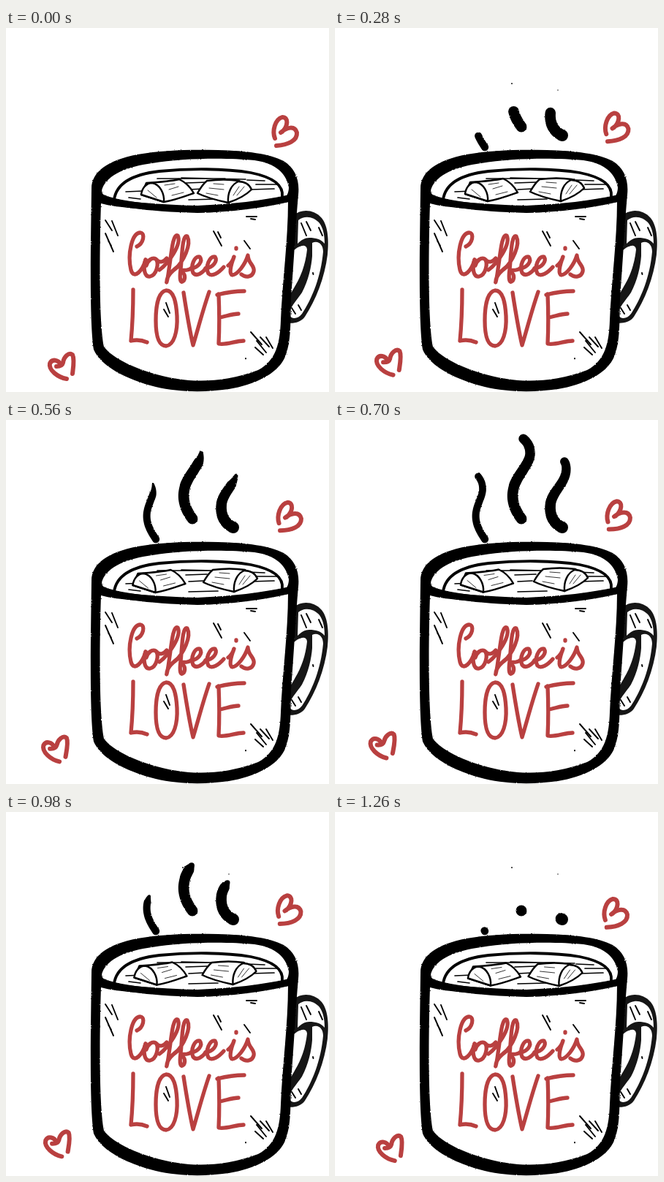
Animation, 442 px wide and 498 px high, one loop 1400 ms. Source, as an HTML page:

```html
<!DOCTYPE html>
<html lang="en">
<head>
<meta charset="utf-8">
<title>Coffee is love</title>
<style>
html, body { margin: 0; width: 100%; height: 100%; overflow: hidden; background: #fff; }
svg { display: block; width: 100vw; height: 100vh; }
.line { fill: none; stroke: #000; stroke-linecap: round; stroke-linejoin: round; }
.red { fill: none; stroke: #b94040; stroke-linecap: round; stroke-linejoin: round; }
.white { fill: #fff; }
</style>
</head>
<body>
<svg viewBox="0 0 442 498" role="img" aria-label="Coffee is LOVE">
  <defs>
    <filter id="rough" filterUnits="userSpaceOnUse" x="0" y="0" width="442" height="498" color-interpolation-filters="sRGB">
      <feTurbulence type="fractalNoise" baseFrequency=".5" numOctaves="2" seed="4"/>
      <feDisplacementMap in="SourceGraphic" scale="2.2" xChannelSelector="R" yChannelSelector="G"/>
    </filter>
  </defs>

  <!-- handle -->
  <g fill="#161616">
    <path d="M394 256C404 247 422 248 432 260C441 271 442 292 440 310C436 342 424 372 409 395C402 405 388 405 378 402L380 374C391 364 399 349 404 329C408 315 411 304 407 300C403 297 399 300 394 304Z"/>
    <path class="white" d="M400 263C409 256 421 258 429 267C434 274 436 283 436 295C431 289 424 287 415 287C409 287 404 290 399 295Z"/>
    <path class="white" d="M419 294C427 290 434 296 434 306C431 340 419 370 405 391C400 398 391 399 388 393C387 383 397 374 405 362C414 345 418 326 419 312Z"/>
    <path class="white" d="M396 304C402 297 411 295 412 303C410 323 403 343 392 358Z"/>
  </g>

  <!-- mug -->
  <g filter="url(#rough)">
    <path d="M117 220C117 196 140 181 180 173C215 167 250 166 290 167C330 168 360 172 380 182C396 192 402 208 400 228C397 260 394 320 390 370C389 400 391 430 381 452C370 474 340 488 305 494C270 499 235 498 205 491C165 481 130 463 120 440C114 400 116 300 117 220Z"/>
    <path class="white" d="M130 240C150 246 210 250 262 252C310 250 350 245 386 238C386 290 378 350 376 400C375 430 370 455 345 468C310 481 280 484 250 482C205 478 150 458 134 436C127 400 128 300 130 240Z"/>
    <path class="white" d="M132 219C140 200 165 190 200 185C240 178 300 177 340 181C370 185 384 200 387 218C387 224 385 228 384 229C350 236 310 241 262 243C210 242 160 237 140 233C134 230 129 225 132 219Z"/>
  </g>
  <path class="line" stroke-width="3.8" d="M148 235C151 211 175 200 210 196C250 192 300 192 335 198C365 204 380 215 378 231"/>

  <!-- drink -->
  <path class="line" stroke-width="1.7" d="M207 206L300 206M240 205L328 207M246 212L275 211M330 208L354 209M342 214L373 214M164 224L188 223M168 232L184 234M250 221L270 220M335 221L367 220M250 235L290 234"/>
  <g id="sweetL">
    <path class="line" style="fill:#fff" stroke-width="2.4" d="M192 212C208 211 224 210 237 207C246 211 253 219 257 226C243 231 230 236 216 238L185 228Z"/>
    <path class="line" style="fill:#fff" stroke-width="2.4" d="M185 228C186 219 192 212 200 212C211 214 217 227 216 238Z"/>
    <path class="line" stroke-width=".8" d="M194 222L206 232M217 215L231 213M223 221L236 217M227 229L243 225"/>
  </g>
  <g id="sweetR">
    <path class="line" style="fill:#fff" stroke-width="2.4" d="M262 226C266 219 270 213 275 209C290 207 306 207 319 209L334 218L304 239C290 236 274 232 262 226Z"/>
    <path class="line" style="fill:#fff" stroke-width="2.4" d="M304 239C303 226 308 214 318 210C327 210 333 214 336 221C328 229 316 235 304 239Z"/>
    <path class="line" stroke-width=".8" d="M311 229L319 217M316 229L326 217M278 219L298 221M284 213L298 214M274 226L290 229"/>
  </g>
  <path class="line" stroke-width="9" filter="url(#rough)" d="M127 230C150 242 210 247 262 248.500C310 247 350 242 388 233"/>

  <!-- shading -->
  <path class="line" stroke-width="1.9" d="M136 263L145 277M145 264L153 284M136 281L147 306M140 291L144 298M284 278L295 298M290 279L294 287M326 291L334 302M329 258L343 258M335 261L341 262M335 416L350 433M341 437L352 447M343 428L356 444M348 423L360 436M356 423L365 438M328 452L328 452.400M404 267L411 284M411 265L417 277M428 273L433 284M420 335L420.500 337M391 383L396 391M400 379L404 386M219 376L224 390M216 385L222 395"/>

  <!-- lettering -->
  <g class="red" stroke-width="5.300">
    <path d="M179 299C188 295 191 281 184 280C172 280 166 310 171 331C175 345 187 332 191 317"/>
    <path d="M191 317C187 330 190 341 197 340C206 338 210 322 205 316C200 313 194 318 192 325M206 317C210 322 216 320 220 315"/>
    <path d="M210 331C222 322 241 296 235 284C228 280 226 312 223 330C221 346 219 350 220 347C220 340 226 333 236 326"/>
    <path d="M231 330C243 320 254 296 248 285C241 282 241 312 239 330C237 345 239 350 243 346C247 340 243 334 239 331C246 332 251 331 255 328"/>
    <path d="M253 329C263 328 270 319 265 313C258 312 252 325 256 335C261 341 269 335 274 328"/>
    <path d="M273 329C283 328 290 319 286 313C279 312 272 326 277 336C282 341 291 335 298 327"/>
    <path d="M304 325C308 322 311 317 312 313C307 326 305 337 310 338C317 337 327 324 331 311C331 322 341 325 339 333C337 341 328 342 322 337M315 301L315 302"/>
    <path d="M174 358C174 384 173 407 171 428C179 426 186 427 193 430"/>
    <path d="M219 359C208 361 205 382 205 400C205 421 209 435 219 435C230 434 235 415 234 394C233 376 230 359 219 359Z"/>
    <path d="M243 362C247 388 251 412 256 434C263 411 269 387 278 361"/>
    <path d="M291 364C292 388 292 412 291 432C302 434 314 428 325 428M289 365C301 362 314 360 326 360M292 396C300 395 309 391 318 391"/>
  </g>

  <path id="steam" filter="url(#rough)"/>
  <g id="heartL" class="red" stroke-width="6">
    <path d="M83 480C71 478 58 468 60 459C63 452 72 454 75 461M69 463C74 463 77 462 78 458C79 450 86 443 91 447C94 453 92 465 91 473"/>
  </g>
  <g id="heartR" class="red" stroke-width="6">
    <path d="M368 151C364 141 368 125 378 122C387 122 386 134 378 142M376 143C384 136 395 133 398 143C399 154 386 160 370 161"/>
  </g>
</svg>
<script>
const STEP = 140, STEPS = 10;
const NS = "http://www.w3.org/2000/svg";
const byId = id => document.getElementById(id);

// Each strand runs upward; tops holds its upper edge per pose.
const strands = [
  { d: "M205 163C197 151 191 140 193 126C195 114 202 104 202 95C202 86 199 81 195 76",
    r: [5.2, 5, 4.8], tops: [999, 157, 142, 113, 86, 72] },
  { d: "M255 135C246 123 241 110 244 95C247 77 266 62 267 46C267 36 263 30 257 25",
    r: [7.5, 7.3, 6.5], tops: [999, 127, 106, 69, 42, 19] },
  { d: "M311 147C298 141 293 129 295 114C298 98 313 88 316 72C317 65 316 60 314 57",
    r: [8, 7, 6], tops: [999, 138, 108, 93, 73, 51] }
].map(s => {
  const path = document.createElementNS(NS, "path");
  path.setAttribute("d", s.d);
  const len = path.getTotalLength();
  const pts = Array.from({ length: 121 }, (_, i) => path.getPointAtLength(len * i / 120));
  return { ...s, pts };
});

const dot = (x, y, r) =>
  `M${x - r} ${y}a${r} ${r} 0 1 0 ${2 * r} 0a${r} ${r} 0 1 0 ${-2 * r} 0Z`;

function strand({ pts, r, tops }, pose) {
  const top = tops[pose];
  const taper = [0, 0, 6, 14, 22, 0][pose];
  let d = "";
  pts.forEach((p, i) => {
    const u = i / 60;
    let rad = u < 1 ? r[0] + (r[1] - r[0]) * u : r[1] + (r[2] - r[1]) * (u - 1);
    if (taper) rad *= Math.min(1, .25 + Math.max(0, p.y - top) / taper);
    if (i === 0 || p.y - rad >= top) d += dot(p.x, p.y, rad);
  });
  return d;
}

function steam(pose) {
  if (!pose) return "";
  const specks = pose < 4 ? dot(242, 76, .9) + dot(305, 85, .7) : "";
  return strands.map(s => strand(s, pose)).join("") + specks;
}

const movers = [
  { id: "sweetL", x: [0, -3, -7, -9.5, -11.5, -13], dy: -2.5, turn: 0, c: "222 222" },
  { id: "sweetR", x: [0, 2.5, 5, 6.5, 8, 10], dy: -5, turn: 0, c: "300 222" },
  { id: "heartL", x: [0, -1, -3, -6, -9, -11.5], y: [0, -3, -5.5, -9, -13, -18], turn: 4, c: "75 464" },
  { id: "heartR", x: [0, 2, 3.5, 5.5, 6, 6], y: [0, -3, -5.5, -7.5, -9, -10.5], turn: 4, c: "382 143" }
];

let shown = -1;
function draw(ms) {
  const n = Math.floor(ms / STEP) % STEPS;
  const pose = Math.min(n, STEPS - n);
  if (pose === shown) return;
  shown = pose;
  byId("steam").setAttribute("d", steam(pose));
  for (const m of movers) {
    const y = m.y ? m.y[pose] : m.dy * pose / 5;
    byId(m.id).setAttribute("transform",
      `translate(${m.x[pose]} ${y}) rotate(${m.turn * pose / 5} ${m.c})`);
  }
}

const start = performance.now();
function tick() {
  draw(performance.now() - start);
  requestAnimationFrame(tick);
}
tick();
</script>
</body>
</html>
```
